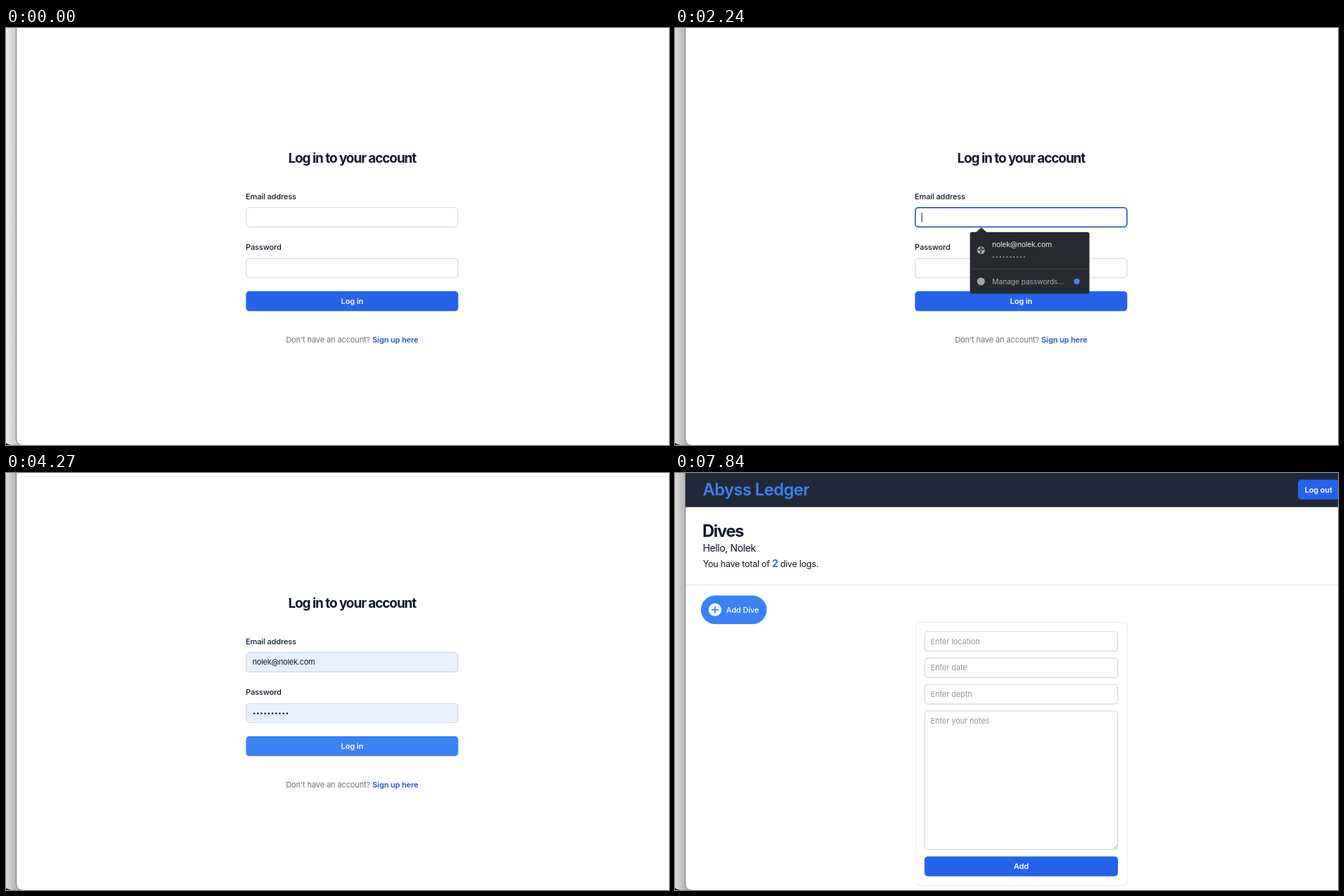
Recreate the animation shown at these times as an HTML page. Size 943 px wide and 594 px high, loop 8000 ms.

```html
<!DOCTYPE html>
<html lang="en">
<head>
<meta charset="utf-8">
<title>Dive log</title>
<style>
  html, body { margin: 0; width: 100%; height: 100%; overflow: hidden; background: #fff; }
  svg { display: block; width: 100%; height: 100%; }
  text { font: 400 11px Inter, Roboto, sans-serif; letter-spacing: -.01em; fill: #111827; white-space: pre; }
  .mid { text-anchor: middle; }
  .medium { font-weight: 500; }
  .semi { font-weight: 600; }
  .light { fill: #fff; }
  .grey { fill: #6b7280; }
  .hint { fill: #9299a4; }
  .body { font-size: 12.57px; letter-spacing: -.022em; }
  .hello { font-size: 14.1px; letter-spacing: -.03em; }
  .place { font-size: 15.7px; font-weight: 500; letter-spacing: -.03em; }
  .title { font-size: 18.86px; font-weight: 700; letter-spacing: -.054em; }
  .head { font-size: 23.6px; font-weight: 700; letter-spacing: -.053em; }
  .brand { font-size: 23.6px; font-weight: 600; letter-spacing: -.02em; fill: #3b82f6; }
  .mail { letter-spacing: -.024em; }
  .popup text { font-size: 10.5px; letter-spacing: -.022em; fill: #e4e6e8; }
  .popup .dim { fill: #a3a7ab; }
  .link { font-weight: 600; fill: #2458c4; }
  .count { font-size: 14.1px; font-weight: 600; fill: #2563eb; }
  .field { fill: #fff; stroke: #d3d5da; stroke-width: 1.1; }
  .card { fill: #fff; stroke: #e5e7eb; stroke-width: 1; }
  .blue { fill: #2563eb; }
</style>
</head>
<body>
<svg viewBox="0 0 943 594" preserveAspectRatio="none">
  <defs>
    <linearGradient id="shade">
      <stop id="shadeFar" offset="0"/>
      <stop id="shadeNear" offset="1"/>
    </linearGradient>
    <filter id="lift" x="-5%" y="-5%" width="110%" height="112%">
      <feDropShadow dx="0" dy="1" stdDeviation="1" flood-color="#000" flood-opacity=".16"/>
    </filter>
  </defs>

  <rect width="943" height="594" fill="#fff"/>
  <rect width="26" height="594" fill="url(#shade)"/>
  <path d="M0 591Q2 593 8 594H0Z" fill="#1c1c1c"/>
  <path d="M14.6 -2V584Q14.6 594.5 24 594.5H950V-2Z" fill="#fff" stroke="#747474" stroke-width="1"/>

  <g id="login">
    <text class="title mid" x="492.3" y="191.5">Log in to your account</text>
    <text class="medium" x="341" y="243.6">Email address</text>
    <rect id="email" class="field" x="341.8" y="255.8" width="301" height="27.6" rx="4.5"/>
    <text class="medium" x="341" y="316">Password</text>
    <rect id="password" class="field" x="341.8" y="328.2" width="301" height="27.6" rx="4.5"/>
    <g id="values">
      <text class="mail" x="350.6" y="273.4">nolek@nolek.com</text>
      <g id="secret"></g>
    </g>
    <rect id="caret" y="263" width="1" height="13.5" fill="#111"/>
    <rect id="submit" x="341.3" y="375" width="302" height="28.3" rx="4.7"/>
    <text class="semi light mid" x="492.3" y="393">Log in</text>
    <text class="grey mid" x="492.3" y="448">Don't have an account? <tspan class="link">Sign up here</tspan></text>

    <g id="popup" class="popup">
      <path d="M427.5 291.5L435.7 284.3L444 291.5Z" fill="#282c2f"/>
      <rect x="419.6" y="290.8" width="169.8" height="87.4" rx="3" fill="#282c2f" filter="url(#lift)"/>
      <path id="row" d="M419.6 291H589.4V343H419.6Z" fill="#3a3e42"/>
      <path d="M419.6 343.3H589.4" stroke="#3d4144"/>
      <circle cx="435.2" cy="316.6" r="5.6" fill="#a9adb0"/>
      <path d="M430.5 315.5l3.5 1 1.5 2 -1 3M436 311.8l-1 2.5 2.5 1.5 2.5-1" fill="none" stroke="#282c2f" stroke-width="1.6"/>
      <text x="451" y="312">nolek@nolek.com</text>
      <g id="hidden"></g>
      <circle cx="435.2" cy="361" r="5.6" fill="#a0a4a7"/>
      <text class="dim" x="451" y="364.8">Manage passwords...</text>
      <circle cx="571.5" cy="361" r="4.2" fill="#4c7fe8"/>
    </g>
  </g>

  <g id="dives">
    <rect x="15" width="928" height="48.6" fill="#1f2937"/>
    <text class="brand" x="39.5" y="32.2">Abyss Ledger</text>
    <rect class="blue" x="886" y="9.5" width="58" height="28.3" rx="4.7"/>
    <text class="semi light mid" x="915.2" y="27.7">Log out</text>
    <text class="head" x="39" y="90.6">Dives</text>
    <text class="hello" x="39.5" y="112">Hello, Nolek</text>
    <text class="body" x="39.8" y="133.8">You have total of <tspan class="count">2</tspan> dive logs.</text>
    <path d="M15 159.3H943" stroke="#e1e3e8"/>
    <rect id="add"/>
    <circle cx="56.9" cy="194.8" r="9.2" fill="#fff"/>
    <path id="plus" d="M52 194.8H61.8M56.9 189.9V199.7" stroke-width="1.7"/>
    <text class="medium light" x="72.8" y="198.8">Add Dive</text>
    <g id="cards"></g>
    <g id="form">
      <rect class="card" x="342.2" y="212.5" width="300.8" height="374.8" rx="4.7"/>
      <g id="inputs"></g>
      <path d="M623.5 535.5l5.5-5.5M626.8 535.5l2.2-2.2" stroke="#777" stroke-width=".8"/>
      <rect class="blue" x="354.8" y="546.2" width="275.2" height="28.2" rx="4.7"/>
      <text class="semi light mid" x="492.3" y="564.3">Add</text>
    </g>
  </g>
</svg>
<script>
const LOOP = 8000;
const $ = id => document.getElementById(id);
const set = (id, attrs) => {
  for (const key in attrs) $(id).setAttribute(key, attrs[key]);
};
const show = (id, on) => { $(id).style.display = on ? '' : 'none'; };

const dots = (x, y, gap, r, fill) => Array.from({ length: 10 }, (_, i) =>
  `<circle cx="${x + i * gap}" cy="${y}" r="${r}" fill="${fill}"/>`).join('');
$('secret').innerHTML = dots(353, 342.4, 5.2, 1.25, '#111');
$('hidden').innerHTML = dots(453, 326.2, 4.85, 0.9, '#b9bcbf');

const card = (x, place, date, depth, notes) => {
  const mid = x + 143.2;
  return `<rect class="card" x="${x}" y="228.5" width="286.4" height="197" rx="4.7" filter="url(#lift)"/>
    <text class="place mid" x="${mid}" y="277">${place}</text>
    <text class="grey mid" x="${mid}" y="297">${date}</text>
    <text class="body mid" x="${mid}" y="315">Depth: ${depth}</text>
    <text class="body mid" x="${mid}" y="337">${notes}</text>
    <rect x="${mid - 30.3}" y="363.8" width="60.6" height="29.8" rx="4.7" fill="#f87171"/>
    <text class="medium mid" x="${mid}" y="382.6">Delete</text>`;
};
$('cards').innerHTML =
  card(40.3, 'Turkey', '2023-12-01', 19, 'Notes about dive') +
  card(349, 'Malta', '2021-12-11', 14, 'Notes about Malta');

const input = (y, height, hint) =>
  `<rect class="field" x="355.2" y="${y}" width="274.4" height="${height}" rx="4.5"/>
   <text class="hint" x="363.6" y="${y + 17.8}">${hint}</text>`;
$('inputs').innerHTML =
  input(225.8, 27.8, 'Enter location') +
  input(263.6, 27.8, 'Enter date') +
  input(301.3, 27.8, 'Enter depth') +
  input(339, 197.4, 'Enter your notes');

const within = (t, from, to) => t >= from && t < to;
const mix = (a, b, p) => `rgb(${a.map((v, i) => Math.round(v + (b[i] - v) * p))})`;
const BLUE = [37, 99, 235], HOVER = [59, 130, 246];

function drawLogin(t) {
  const filled = t >= 2730;
  const focus = within(t, 1190, 4270);
  const fill = filled ? '#e7f0fe' : '#fff';
  $('email').style.fill = fill;
  $('password').style.fill = fill;
  $('email').style.stroke = focus ? '#2a5dc2' : '';
  $('email').style.strokeWidth = focus ? 1.7 : '';
  show('values', filled);
  show('popup', within(t, 1260, 3080));
  show('row', filled);
  show('caret', within(t, 1190, 1750) || within(t, 2240, 2730) ||
    within(t, 3080, 3640) || within(t, 4130, 4270));
  set('caret', { x: t < 3080 ? 350.6 : 438.9 });
  set('submit', { fill: mix(BLUE, HOVER, t >= 3640 ? 1 : 0) });
}

function drawDives(t) {
  // Hover eases in over four discrete steps.
  const p = t < 7630 ? 0 : Math.min(1, (Math.floor((t - 7630) / 70) + 1) / 4);
  const grow = 3.2 * p;
  const color = mix(BLUE, HOVER, p);
  set('add', {
    x: 40 - grow, y: 177.6 - grow,
    width: 87.3 + 2 * grow, height: 34.4 + 2 * grow,
    rx: 17.2 + grow, fill: color
  });
  set('plus', { stroke: color });
  show('cards', t < 7770);
  show('form', t >= 7770);
}

function draw() {
  const t = performance.now() % LOOP;
  const dark = t >= 700;
  set('shadeFar', { 'stop-color': dark ? '#d9d9d9' : '#ededed' });
  set('shadeNear', { 'stop-color': dark ? '#999' : '#acacac' });
  show('login', t < 6090);
  show('dives', t >= 6090);
  if (t < 6090) drawLogin(t);
  else drawDives(t);
  requestAnimationFrame(draw);
}
draw();
</script>
</body>
</html>
```
